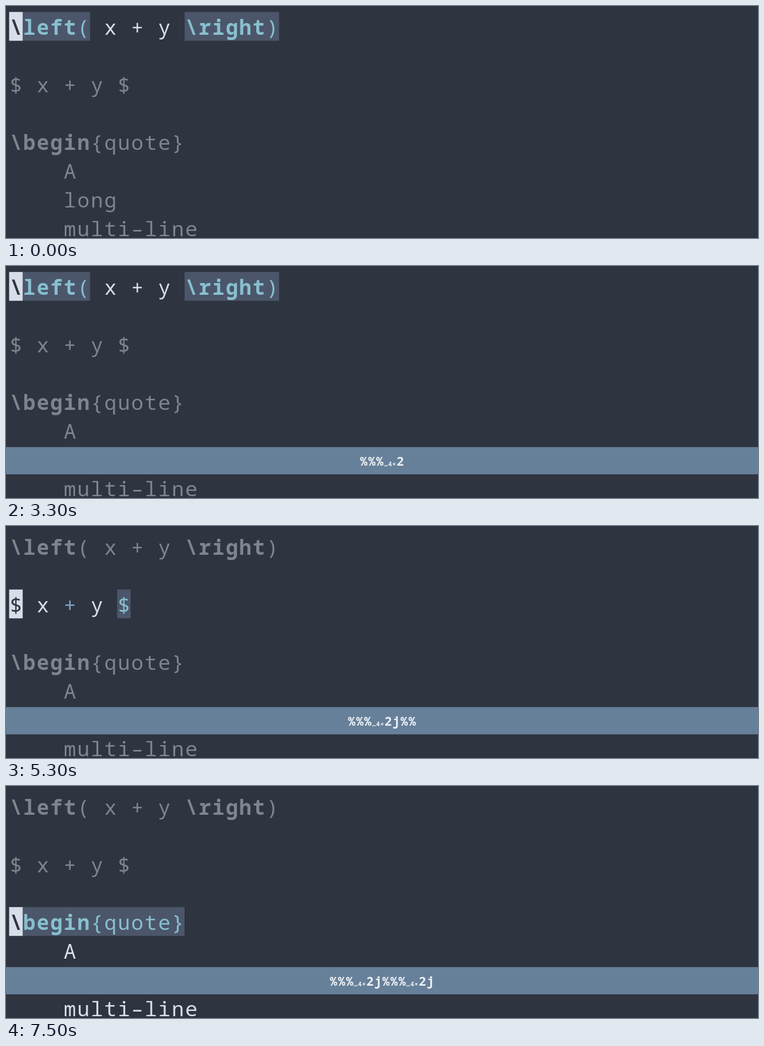
Recreate the animation shown at these times as an HTML page with a canvas. Size 1280 px wide and 395 px high, loop 8000 ms.

```html
<!DOCTYPE html>
<html lang="en">
<head>
<meta charset="utf-8">
<title>Jumping between matching delimiters</title>
<style>
  html, body { margin: 0; width: 100%; height: 100%; overflow: hidden; background: #2e3440; }
  canvas { display: block; }
</style>
</head>
<body>
<canvas id="stage" width="1280" height="395"></canvas>
<script>
const ctx = document.getElementById('stage').getContext('2d');
const LOOP = 8000;
const CELL = 22.97, ROW = 49, LEFT = 5.4, TOP = 10.2, BASELINE = 38.5;
const KEY = 13.65, SMALL = 7;
const COLOR = {
  back: '#2e3440', text: '#d8dee9', dim: '#7f848e', match: '#88c0d0',
  matchBack: '#4c566a', operator: '#81a1c1', bar: '#67809a', key: '#eceff4'
};
const font = (weight, size) => `${weight} ${size}px "Noto Sans Mono", "DejaVu Sans Mono", monospace`;
const FONT = {
  regular: font(400, 35), bold: font(700, 35), key: font(700, 20.8), small: font(700, 10.7)
};

// Each paragraph is lit while the cursor is inside it.
const lines = [
  { row: 0, group: 0, text: '\\left( x + y \\right)', bold: [[0, 5], [13, 19]], match: [[0, 6], [13, 20]] },
  { row: 2, group: 2, text: '$ x + y $', match: [[0, 1], [8, 9]], operator: 4 },
  { row: 4, group: 4, text: '\\begin{quote}', bold: [[0, 6]], match: [[0, 13]] },
  { row: 5, group: 4, text: '    A' },
  { row: 6, group: 4, text: '    long' },
  { row: 7, group: 4, text: '    multi–line' }
];

// [time, row, column]
const cursorMoves = [
  [0, 0, 0], [500, 0, 19], [1200, 0, 0], [1800, 0, 19], [2300, 0, 0], [3400, 2, 0],
  [4600, 2, 8], [5100, 2, 0], [5900, 2, 8], [6400, 2, 0], [7300, 4, 0]
];

// [time, label]; a label of several characters is a small repeat count.
const keyPresses = [
  [500, '%'], [1200, '%'], [1800, '%'], [2300, '…4×'], [3100, '2'], [3400, 'j'],
  [4600, '%'], [5100, '%'], [5900, '%'], [6300, '…4×'], [7100, '2'], [7300, 'j']
];

const inRanges = (ranges = [], i) => ranges.some(([a, b]) => i >= a && i < b);

function rect(color, x, y, w, h) {
  ctx.fillStyle = color;
  ctx.fillRect(x, y, w, h);
}

function glyph(char, centerX, y, font, color) {
  ctx.textAlign = 'center';
  ctx.font = font;
  ctx.fillStyle = color;
  ctx.fillText(char, centerX, y);
}

function drawLine({ row, group, text, bold, match = [], operator }, cursorRow, cursorColumn) {
  const lit = group === cursorRow;
  const y = TOP + row * ROW;
  const fillCells = (color, from, to) => rect(color, LEFT + from * CELL, y, (to - from) * CELL, ROW);
  const hasCursor = row === cursorRow;

  if (lit) match.forEach(([from, to]) => fillCells(COLOR.matchBack, from, to));
  if (hasCursor) fillCells(COLOR.text, cursorColumn, cursorColumn + 1);

  [...text].forEach((char, i) => {
    let color = lit ? COLOR.text : COLOR.dim;
    if (lit && i === operator) color = COLOR.operator;
    if (lit && inRanges(match, i)) color = COLOR.match;
    if (hasCursor && i === cursorColumn) color = COLOR.back;
    glyph(char, LEFT + (i + 0.5) * CELL, y + BASELINE, inRanges(bold, i) ? FONT.bold : FONT.regular, color);
  });
}

function drawKeys(time) {
  const pressed = keyPresses.filter(([start]) => start <= time);
  if (!pressed.length) return;
  rect(COLOR.bar, 0, 308.3, 1280, 46.4);
  const widthOf = label => label.length > 1 ? label.length * SMALL : KEY;
  let x = 640 - pressed.reduce((sum, [, label]) => sum + widthOf(label), 0) / 2;
  pressed.forEach(([start, label], i) => {
    const small = label.length > 1, width = widthOf(label), step = width / label.length;
    [...label].forEach((char, n) => {
      glyph(char, x + (n + 0.5) * step, small ? 341.3 : 339.8, small ? FONT.small : FONT.key, COLOR.key);
    });
    if (i === pressed.length - 1 && time < start + 200) {
      rect(COLOR.key, x, small ? 342 : 341.4, width, small ? 0.8 : 1.4);
    }
    x += width;
  });
}

function draw(now) {
  const time = now % LOOP;
  const [, row, column] = cursorMoves.filter(([start]) => start <= time).pop();
  rect(COLOR.back, 0, 0, 1280, 395);
  lines.forEach(line => drawLine(line, row, column));
  drawKeys(time);
  requestAnimationFrame(() => draw(performance.now()));
}
draw(performance.now());
</script>
</body>
</html>
```
